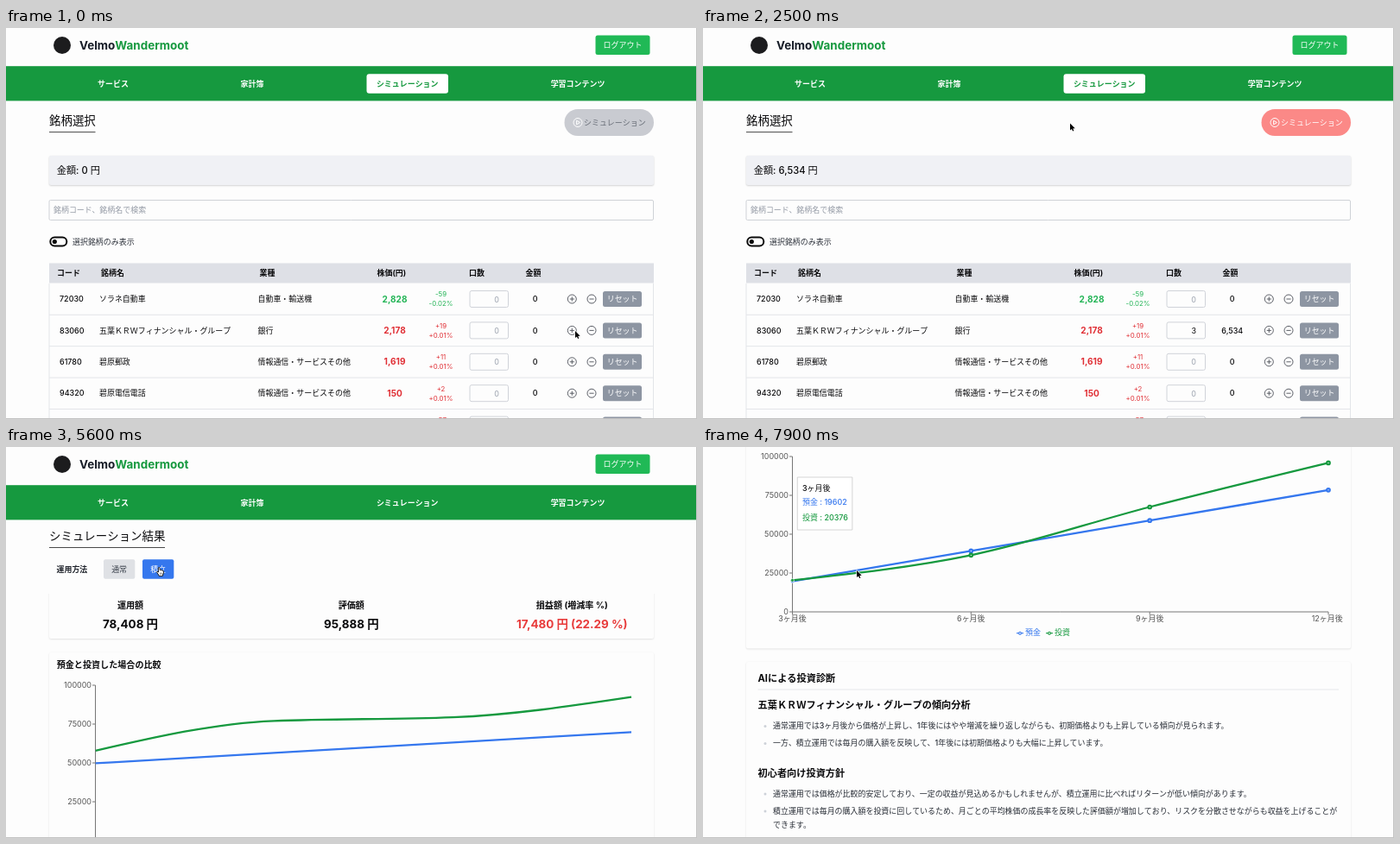
These frames come from a looping animation (800x453 px, 8 s). An HTML page with a canvas:

```html
<!DOCTYPE html>
<html lang="ja">
<head>
<meta charset="utf-8">
<title>投資シミュレーション</title>
<style>
html, body { margin: 0; width: 100%; height: 100%; overflow: hidden; background: #fdfdfd; }
canvas { display: block; width: 800px; height: 453px; }
</style>
</head>
<body>
<canvas id="stage"></canvas>
<script>
const W = 800, H = 453, LOOP = 8000, STEP = 100;
const canvas = document.getElementById('stage');
const ctx = canvas.getContext('2d');
const dpr = window.devicePixelRatio || 1;
canvas.width = W * dpr;
canvas.height = H * dpr;

const FONT = 'Inter, "Noto Sans CJK JP", "Noto Sans CJK", sans-serif';
const SM = 7.84, BASE = 8.96, MD = 10.08, LG = 11.2, XL = 13.44;
const GREEN = '#16993f', BLUE = '#3577ee', RED = '#e83c3c', INK = '#0b0b0d';

// Times in ms
const CLICKS = [400, 700, 1000];
const RESULT_AT = 2740, DRAW_AT = 2788, SWITCH_AT = 5270, DRAW_MS = 1500;
const SCROLL_AT = 7431, SCROLL_MS = 469, SCROLL_BY = 265;
const MOUSE = [[0, 659, 351], [1200, 659, 351], [1900, 681, 109], [2300, 681, 109],
  [2700, 169, 112], [4700, 169, 112], [5100, 178, 143]];

const clamp = v => Math.max(0, Math.min(1, v));
const mix = (a, b, p) => a + (b - a) * p;
const smooth = p => p * p * (3 - 2 * p);
const smoother = p => p * p * p * (10 - 15 * p + 6 * p * p);

// CSS "ease": cubic-bezier(.25, .1, .25, 1)
function ease(x) {
  if (x <= 0 || x >= 1) return clamp(x);
  const bez = (a, b, u) => 3 * a * u * (1 - u) ** 2 + 3 * b * u * u * (1 - u) + u ** 3;
  let lo = 0, hi = 1;
  for (let i = 0; i < 24; i++) {
    const mid = (lo + hi) / 2;
    if (bez(.25, .25, mid) < x) lo = mid; else hi = mid;
  }
  return bez(.1, 1, lo);
}

function text(str, x, y, size = BASE, color = INK, weight = 500, align = 'left') {
  ctx.font = `${weight} ${size}px ${FONT}`;
  ctx.textAlign = align;
  ctx.fillStyle = color;
  ctx.fillText(str, x, y + size * .365);
}

function box(x, y, w, h, r, fill, stroke, line = 1) {
  ctx.beginPath();
  ctx.roundRect(x, y, w, h, r);
  if (fill) { ctx.fillStyle = fill; ctx.fill(); }
  if (stroke) { ctx.strokeStyle = stroke; ctx.lineWidth = line; ctx.stroke(); }
}

function line(x1, y1, x2, y2, color, width = 1) {
  ctx.beginPath();
  ctx.moveTo(x1, y1);
  ctx.lineTo(x2, y2);
  ctx.strokeStyle = color;
  ctx.lineWidth = width;
  ctx.stroke();
}

function circle(x, y, r, fill, stroke, width = 1) {
  ctx.beginPath();
  ctx.arc(x, y, r, 0, 7);
  if (fill) { ctx.fillStyle = fill; ctx.fill(); }
  if (stroke) { ctx.strokeStyle = stroke; ctx.lineWidth = width; ctx.stroke(); }
}

function card(x, y, w, h, fill = '#fdfdfd', shade = .13) {
  ctx.save();
  ctx.shadowColor = `rgba(0,0,0,${shade})`;
  ctx.shadowBlur = 2 * dpr;
  ctx.shadowOffsetY = .7 * dpr;
  box(x, y, w, h, 2, fill);
  ctx.restore();
}

function header(fade) {
  circle(65, 20, 10, '#1c1c1e');
  text('Velmo', 85, 20, XL, '#161c27', 700);
  text('Wandermoot', 85 + ctx.measureText('Velmo').width, 20, XL, GREEN, 700);
  box(682.5, 8.5, 63, 22.5, 2.5, '#20b956');
  text('ログアウト', 714, 19.8, BASE, '#fff', 400, 'center');

  ctx.fillStyle = GREEN;
  ctx.fillRect(0, 44.2, W, 40.2);
  text('サービス', 124, 64.5, BASE, '#fff', 700, 'center');
  text('家計簿', 285, 64.5, BASE, '#fff', 700, 'center');
  text('学習コンテンツ', 662, 64.5, BASE, '#fff', 700, 'center');
  if (fade < 1) box(417.5, 53.3, 94.5, 22.5, 3, `rgba(255,255,255,${1 - fade})`);
  const c = [22, 153, 63].map(v => Math.round(mix(v, 255, fade)));
  text('シミュレーション', 464.7, 64.5, BASE, `rgb(${c})`, 700, 'center');
}

const STOCKS = [
  ['72030', 'ソラネ自動車', '自動車・輸送機', '2,828', '-59', '-0.02%'],
  ['83060', '五葉ＫＲＷフィナンシャル・グループ', '銀行', '2,178', '+19', '+0.01%'],
  ['61780', '碧原郵政', '情報通信・サービスその他', '1,619', '+11', '+0.01%'],
  ['94320', '碧原電信電話', '情報通信・サービスその他', '150', '+2', '+0.01%'],
  ['', '', '', '', '-57', '']
];

function stockRow(stock, y, qty) {
  const [code, name, sector, price, diff, rate] = stock;
  const tone = diff === '-59' ? '#22b455' : '#e02f35';
  text(code, 62, y);
  text(name, 108, y);
  text(sector, 291.5, y);
  text(price, 450, y, MD, tone, 700, 'center');
  text(diff, 503.5, y - 5.5, SM, tone, 400, 'center');
  text(rate, 503.5, y + 5.5, SM, tone, 400, 'center');
  box(537, y - 9.5, 44.5, 19, 2, '#fdfdfd', '#d0d3d9');
  text(qty, 571, y + .3, BASE, qty ? INK : '#9ca3af', 400, 'right');
  text((qty * 2178).toLocaleString('en-US'), 612.7, y, BASE, INK, 500, 'center');
  for (const x of [655.3, 678]) {
    circle(x, y, 5, null, '#4b4f57', .9);
    line(x - 2.6, y, x + 2.6, y, '#4b4f57', .9);
  }
  line(655.3, y - 2.6, 655.3, y + 2.6, '#4b4f57', .9);
  box(691, y - 9, 45, 18, 2.5, '#8d95a2');
  text('リセット', 713.6, y, BASE, '#fff', 400, 'center');
  line(50, y + 18.3, 750, y + 18.3, '#e3e5e9');
}

function selectPage(t) {
  const qty = CLICKS.filter(c => t >= c).length;
  text('銘柄選択', 50, 107, XL);
  line(50, 120.6, 103.5, 120.6, '#4a4a4a');

  box(646.5, 94, 103.5, 31, 15.5, qty ? '#fb8987' : '#c9cbd1');
  circle(662, 109.5, 5, null, '#fff', 1);
  ctx.beginPath();
  ctx.moveTo(660.6, 107.2);
  ctx.lineTo(664.4, 109.5);
  ctx.lineTo(660.6, 111.8);
  ctx.closePath();
  ctx.stroke();
  text('シミュレーション', 669, 109.5, BASE, qty ? '#fff' : '#666b75');

  card(50, 148, 700, 34, '#f0f1f5', .2);
  text(`金額: ${(qty * 2178).toLocaleString('en-US')} 円`, 58.7, 164.7, LG);

  box(50, 199.5, 699.5, 23, 1.5, '#fdfdfd', '#cfd2d7');
  text('銘柄コード、銘柄名で検索', 55, 211, BASE, '#949aa5');

  box(51.3, 242.5, 19, 10, 5, '#fff', '#0b0b0b', 2);
  circle(56.3, 247.5, 2.6, '#0b0b0b');
  text('選択銘柄のみ表示', 77, 247.7, BASE, '#30353e');

  ctx.fillStyle = '#dee0e6';
  ctx.fillRect(50, 272.5, 700, 23);
  const heads = [['コード', 59], ['銘柄名', 110], ['業種', 293.5], ['株価(円)', 429.5], ['口数', 536], ['金額', 601.5]];
  for (const [label, x] of heads) text(label, x, 284, BASE, INK, 700);
  STOCKS.forEach((s, i) => stockRow(s, 314 + 36.4 * i, i === 1 ? qty : 0));
  line(50, 296, 50, H, '#e3e5e9');
  line(749.5, 296, 749.5, H, '#e3e5e9');
}

const XS = [103.5, 310.3, 517.2, 724];
const BASE_Y = 456;
const toY = max => v => BASE_Y - 180 * v / max;
const PLANS = [
  { max: 10000, save: [6534, 6534, 6534, 6534], invest: [7720, 9800, 8550, 9060],
    sums: ['6,534 円', '9,060 円', '2,526 円 (38.66 %)'] },
  { max: 100000, save: [19602, 39204, 58806, 78408], invest: [20376, 36500, 67500, 95888],
    sums: ['78,408 円', '95,888 円', '17,480 円 (22.29 %)'] }
];

// Monotone cubic through evenly spaced points
function curve(ys, color) {
  const h = XS[1] - XS[0];
  const s = [0, 1, 2].map(i => (ys[i + 1] - ys[i]) / h);
  const inner = (a, b) => (Math.sign(a) + Math.sign(b)) *
    Math.min(Math.abs(a), Math.abs(b), Math.abs(a + b) / 4);
  const m1 = inner(s[0], s[1]), m2 = inner(s[1], s[2]);
  const m = [(3 * s[0] - m1) / 2, m1, m2, (3 * s[2] - m2) / 2];
  ctx.beginPath();
  ctx.moveTo(XS[0], ys[0]);
  for (let i = 0; i < 3; i++) {
    ctx.bezierCurveTo(XS[i] + h / 3, ys[i] + m[i] * h / 3,
      XS[i + 1] - h / 3, ys[i + 1] - m[i + 1] * h / 3, XS[i + 1], ys[i + 1]);
  }
  ctx.strokeStyle = color;
  ctx.lineWidth = 2.3;
  ctx.stroke();
}

function chart(t, mode, hover) {
  const plan = PLANS[mode], axis = '#777';
  line(XS[0], 276, XS[0], BASE_Y, axis);
  line(XS[0], BASE_Y, XS[3], BASE_Y, axis);
  for (let i = 0; i <= 4; i++) {
    const y = 276 + 45 * i;
    line(100, y, XS[0], y, axis);
    text(plan.max * (4 - i) / 4, 99, y, BASE, '#555', 400, 'right');
  }
  XS.forEach((x, i) => {
    line(x, BASE_Y, x, BASE_Y + 3.3, axis);
    text(`${3 * (i + 1)}ヶ月後`, i === 3 ? 722.7 : x, 464, BASE, '#555', 400, 'center');
  });

  const p = (t - (mode ? SWITCH_AT : DRAW_AT)) / DRAW_MS;
  const e = ease(p);
  const series = [['save', BLUE], ['invest', GREEN]].map(([key, color]) => {
    const first = PLANS[0][key].map(toY(PLANS[0].max));
    const last = PLANS[1][key].map(toY(PLANS[1].max));
    return { color, ys: mode ? first.map((y, i) => mix(y, last[i], e)) : first };
  });
  ctx.save();
  ctx.beginPath();
  ctx.rect(XS[0], 240, mode ? 640 : e * (XS[3] - XS[0]), 230);
  ctx.clip();
  for (const { ys, color } of series) curve(ys, color);
  ctx.restore();
  if (p >= 1) {
    for (const { ys, color } of series) {
      ys.forEach((y, i) => {
        if (hover && i === 0) circle(XS[0], y, 1.9, color, '#fff', .6);
        else circle(XS[i], y, 1.75, '#fff', color, 2.2);
      });
    }
  }

  [['預金', 363, BLUE], ['投資', 397, GREEN]].forEach(([label, x, color]) => {
    line(x, 480.7, x + 8, 480.7, color, 1.1);
    circle(x + 4, 480.7, 1.4, '#fdfdfd', color, 1.1);
    text(label, x + 10, 480, BASE, color);
  });

  if (hover) {
    box(109.3, 300, 63.5, 61, 0, '#fff', '#ccc', .8);
    text('3ヶ月後', 115, 312.5);
    text('預金 : 19602', 115, 328.5, BASE, BLUE);
    text('投資 : 20376', 115, 346.5, BASE, GREEN);
  }
}

const ADVICE = [
  [588, '通常運用では3ヶ月後から価格が上昇し、1年後にはやや増減を繰り返しながらも、初期価格よりも上昇している傾向が見られます。', 1],
  [608, '一方、積立運用では毎月の購入額を反映して、1年後には初期価格よりも大幅に上昇しています。', 1],
  [666.5, '通常運用では価格が比較的安定しており、一定の収益が見込めるかもしれませんが、積立運用に比べればリターンが低い傾向があります。', 1],
  [686.5, '積立運用では毎月の購入額を投資に回しているため、月ごとの平均株価の成長率を反映した評価額が増加しており、リスクを分散させながらも収益を上げることが', 1],
  [702.5, 'できます。', 0]
];

function resultPage(t, scroll) {
  const mode = t >= SWITCH_AT ? 1 : 0;
  text('シミュレーション結果', 50, 103, XL);
  line(50, 116.5, 184, 116.5, '#4a4a4a');
  text('運用方法', 58.5, 142, BASE, '#20242c', 700);
  ['通常', '積立'].forEach((label, i) => {
    const on = i === mode;
    box(113 + 45 * i, 130.2, 36.3, 22.6, 2, on ? BLUE : '#dfe1e5');
    text(label, 131.1 + 45 * i, 141.7, BASE, on ? '#fff' : '#3a404b', 500, 'center');
  });

  card(50, 166, 700, 56);
  ctx.fillStyle = '#fdfdfd';
  ctx.fillRect(48, 160, 704, 10);
  const labels = ['運用額', '評価額', '損益額 (増減率 %)'];
  [144, 399.8, 655.3].forEach((x, i) => {
    text(labels[i], x, 183, MD, INK, 700, 'center');
    text(PLANS[mode].sums[i], x, 204.8, XL, i === 2 ? RED : INK, 700, 'center');
  });

  card(50, 238, 700, 260.5);
  text('預金と投資した場合の比較', 58.7, 252.5, MD, INK, 700);
  chart(t, mode, scroll > 132);

  card(50, 514, 700, 260);
  text('AIによる投資診断', 63.5, 533.3, LG, INK, 700);
  line(63.5, 546, 736, 546, '#e5e7eb');
  text('五葉ＫＲＷフィナンシャル・グループの傾向分析', 63.5, 564.3, LG, INK, 700);
  text('初心者向け投資方針', 63.5, 643.3, LG, INK, 700);
  for (const [y, str, bullet] of ADVICE) {
    if (bullet) circle(72, y + .5, 1.5, '#cdd1d8');
    text(str, 81, y, BASE, '#272c35');
  }
}

function shape(points) {
  ctx.beginPath();
  points.forEach(([x, y]) => ctx.lineTo(x, y));
  ctx.closePath();
}

function drawCursor(t, scroll) {
  let i = MOUSE.length - 1;
  while (t < MOUSE[i][0]) i--;
  const a = MOUSE[i], b = MOUSE[i + 1] || a;
  const p = a === b ? 0 : smooth((t - a[0]) / (b[0] - a[0]));
  const hand = (t >= 200 && t < 1300) || (t >= 1800 && t < 2400) || (t >= 5000 && scroll < 9);
  const beam = t >= RESULT_AT && t < 3000;
  ctx.save();
  ctx.translate(mix(a[1], b[1], p), mix(a[2], b[2], p));
  ctx.lineJoin = 'round';
  if (beam) {
    line(0, -4, 0, 4, '#222', .9);
    line(-1.6, -4.2, 1.6, -4.2, '#222', .8);
    line(-1.6, 4.2, 1.6, 4.2, '#222', .8);
  } else if (hand) {
    shape([[-1.7, -3], [-.9, -3.8], [0, -3], [.2, -.3], [1.6, -.4], [3, 0], [4.3, .6],
      [4.5, 3], [3.6, 5], [3.4, 6.4], [-.9, 6.4], [-1.4, 5], [-3.4, 2.2], [-3, 1.3], [-1.5, 2]]);
    ctx.fillStyle = '#fff';
    ctx.fill();
    ctx.strokeStyle = '#111';
    ctx.lineWidth = .9;
    ctx.stroke();
    for (const x of [.4, 1.7, 3]) line(x, 2.6, x, 4.8, '#333', .5);
  } else {
    shape([[0, 0], [0, 8], [1.9, 6.4], [3.1, 9.1], [4.4, 8.5], [3.2, 5.9], [5.7, 5.7]]);
    ctx.strokeStyle = '#fff';
    ctx.lineWidth = 1.2;
    ctx.stroke();
    ctx.fillStyle = '#000';
    ctx.fill();
  }
  ctx.restore();
}

function render(now) {
  const t = Math.floor((now % LOOP) / STEP) * STEP;
  const scroll = SCROLL_BY * smoother(clamp((t - SCROLL_AT) / SCROLL_MS));
  ctx.setTransform(dpr, 0, 0, dpr, 0, 0);
  ctx.fillStyle = '#fdfdfd';
  ctx.fillRect(0, 0, W, H);
  ctx.save();
  ctx.translate(0, -scroll);
  header(smooth(clamp((t - RESULT_AT) / 125)));
  if (t < RESULT_AT) selectPage(t); else resultPage(t, scroll);
  ctx.restore();
  line(0, 452.5, W, 452.5, '#c4c4c4');
  line(799.5, 0, 799.5, H, '#c4c4c4');
  drawCursor(t, scroll);
  requestAnimationFrame(render);
}
requestAnimationFrame(render);
</script>
</body>
</html>
```
